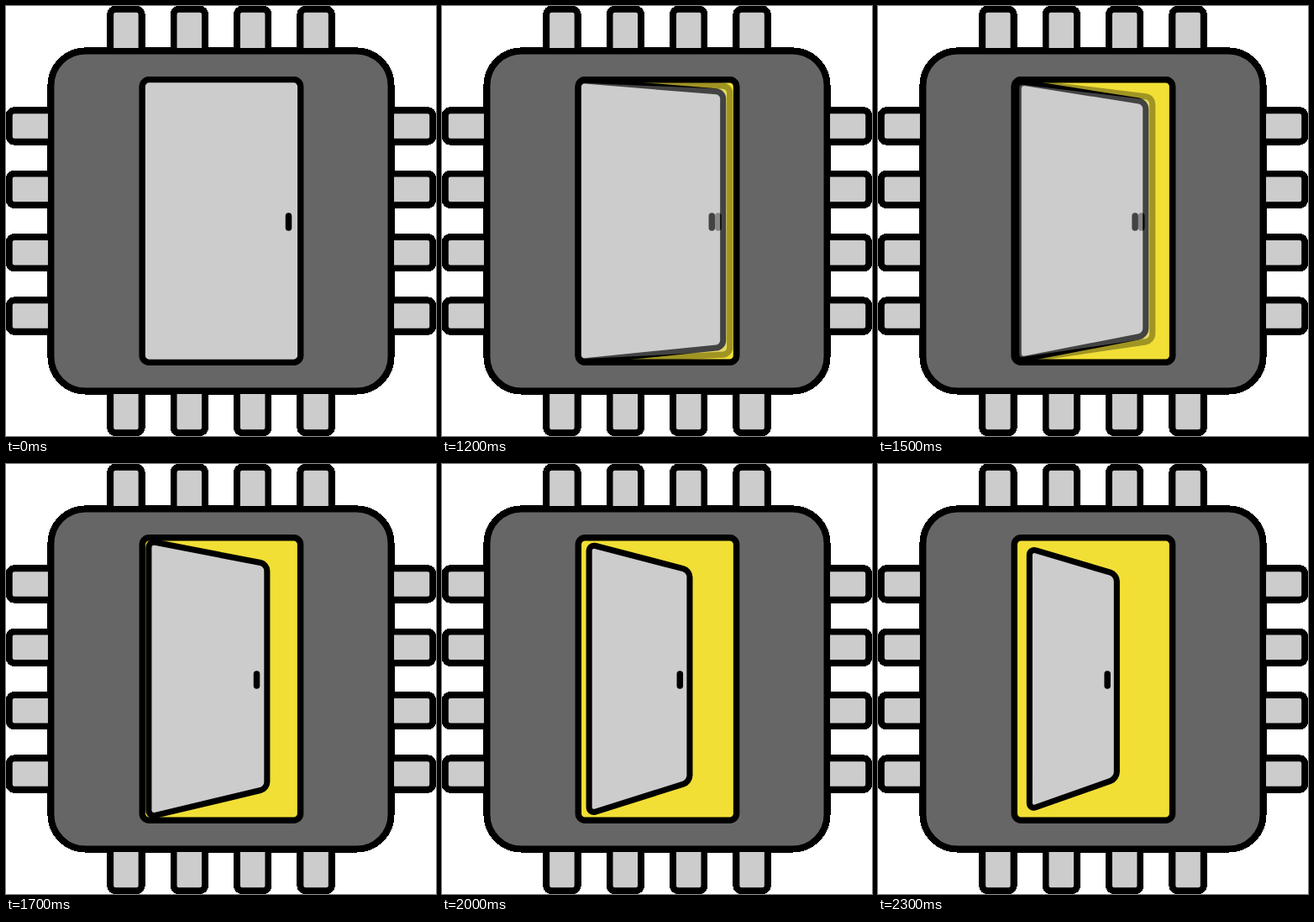
These frames come from a looping animation (512x512 px, 8.3 s). An HTML page:

```html
<!DOCTYPE html>
<html lang="en">
<head>
<meta charset="utf-8">
<title>Chip door</title>
<style>
  html, body { margin: 0; width: 100%; height: 100%; overflow: hidden; background: #fff; }
  svg { display: block; width: 100%; height: 100%; }
</style>
</head>
<body>
<svg viewBox="0 0 512 512" fill="#ccc" stroke="#000" stroke-width="7.5">
  <defs>
    <g id="pins"></g>
    <g id="chip">
      <use href="#pins"/>
      <use href="#pins" transform="rotate(90 256 256)"/>
      <use href="#pins" transform="rotate(180 256 256)"/>
      <use href="#pins" transform="rotate(270 256 256)"/>
      <rect x="53.7" y="53.7" width="404.6" height="404.6" rx="41" fill="#666"/>
    </g>
    <rect id="frame" x="162.3" y="87.8" width="188.3" height="336.4" rx="8" fill="#f1df35"/>
  </defs>
  <!-- hard outer edge, then the smooth drawing -->
  <use href="#chip" stroke-width="8.5" shape-rendering="crispEdges"/>
  <use href="#chip"/>
  <g class="view"><use href="#frame"/><path stroke-width="7.1"/><path stroke-linecap="round"/></g>
  <g class="view"><use href="#frame"/><path stroke-width="7.1"/><path stroke-linecap="round"/></g>
</svg>
<script>
const LOOP = 8300, START = 1000, STEP = 50, FADE_STEPS = 3, LAST = 9;
const LEFT = 162.3, RIGHT = 350.6, TOP = 87.8, BOTTOM = 424.2, HANDLE = 336.5;

const mix = (a, b, f) => a + (b - a) * f;

document.getElementById('pins').innerHTML = [0, 1, 2, 3]
  .map(i => `<rect x="${124.4 + 75.4 * i}" y="4" width="37" height="60" rx="6"/>`)
  .join('');

// Door corners and handle, n poses after closed
function poseAt(n) {
  const swing = n - Math.max(0, n - 7) / 3;
  const lx = LEFT + 2.62 * Math.max(0, n - 2.1);
  const rx = RIGHT - 7.95 * swing;
  const sink = .158 * n * n;
  return {
    corners: [
      [lx, TOP + sink],
      [rx, TOP + n * (8 - .35 * n)],
      [rx, BOTTOM - n * (10 - .5 * n)],
      [lx, BOTTOM - sink]
    ],
    handle: HANDLE - 7.6 * swing
  };
}

function toward(a, b, d) {
  const f = d / Math.hypot(b[0] - a[0], b[1] - a[1]);
  return [mix(a[0], b[0], f), mix(a[1], b[1], f)];
}

function roundedPath(pts, r) {
  return pts.map((p, i) => {
    const prev = pts[(i + 3) % 4], next = pts[(i + 1) % 4];
    const at = (q, d) => toward(p, q, d).map(v => v.toFixed(2)).join();
    return `${i ? 'L' : 'M'}${at(prev, r)}C${at(prev, r * .45)} ${at(next, r * .45)} ${at(next, r)}`;
  }).join('') + 'Z';
}

function drawPose(view, n) {
  const { corners, handle } = poseAt(n);
  const [, door, knob] = view.children;
  door.setAttribute('d', roundedPath(corners, 8));
  knob.setAttribute('d', `M${handle} 250V264`);
}

const [back, front] = document.querySelectorAll('.view');

// Neighbouring poses cross-fade in three steps
function render(t) {
  const step = Math.floor((t - START) / STEP) + 1;
  const pos = Math.min(LAST, Math.max(0, step) / FADE_STEPS);
  const n = Math.floor(pos);
  drawPose(back, n);
  drawPose(front, Math.min(LAST, n + 1));
  front.setAttribute('opacity', (pos - n).toFixed(4));
}

function tick() {
  render(performance.now() % LOOP);
  requestAnimationFrame(tick);
}
tick();
</script>
</body>
</html>
```
